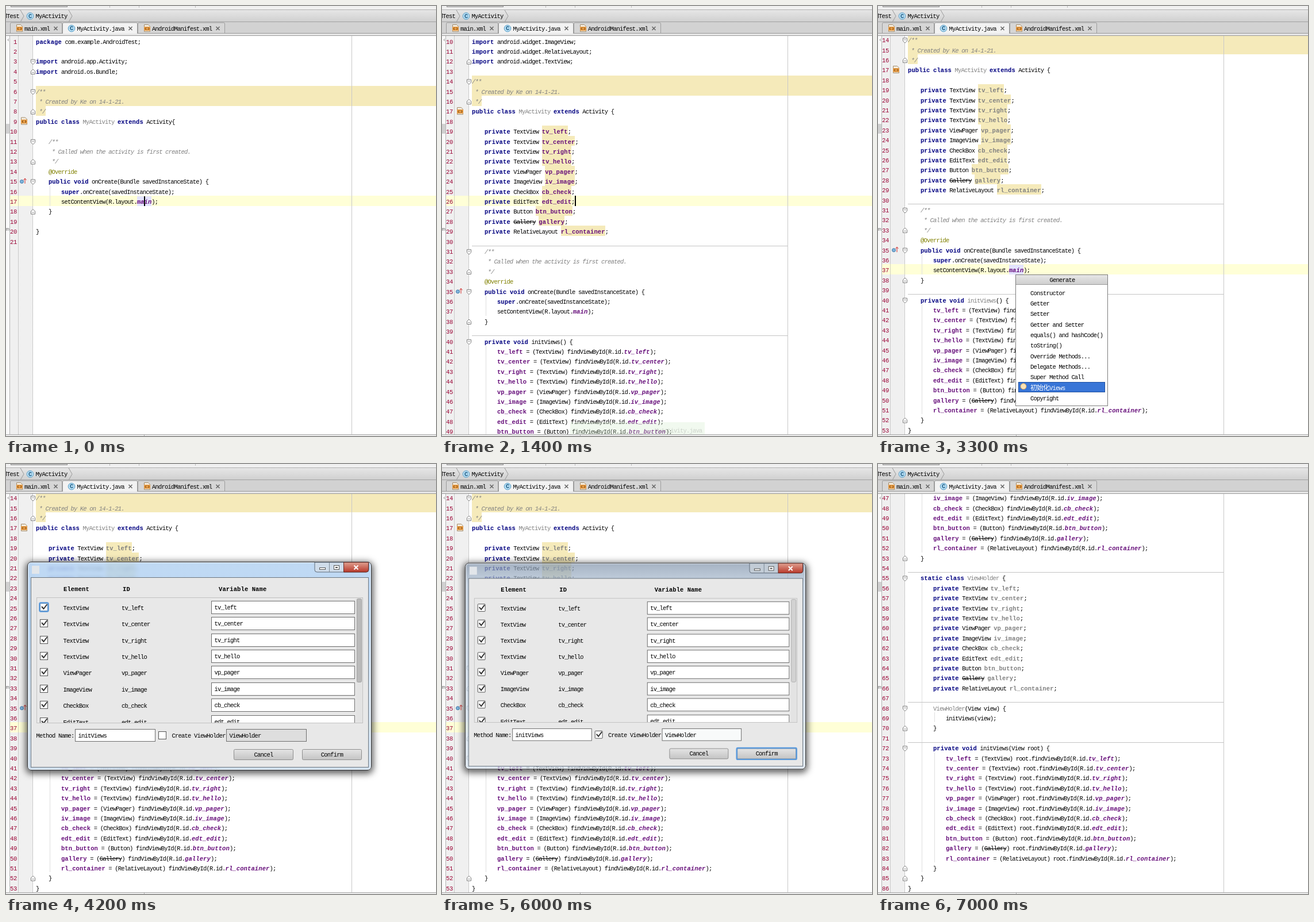
An HTML page for the animation above (8 s loop, 748 by 748 pixels).

```html
<!DOCTYPE html>
<html lang="en">
<head>
<meta charset="utf-8">
<title>Generate view fields</title>
<style>
html, body { margin: 0; width: 100%; height: 100%; overflow: hidden; background: #fff; }
#stage { position: relative; width: 748px; height: 748px; overflow: hidden; }
svg { position: absolute; left: 0; top: 0; display: block; }
text { font: 10.5px "Liberation Mono", "Noto Sans CJK SC", "Noto Sans CJK", monospace; letter-spacing: -.81px; fill: #000; }
rect, line { shape-rendering: crispEdges; }
.k, .i, .f, .n, .b { font-weight: bold; letter-spacing: .11px; }
.k { fill: #000080; }
.i, .f { fill: #660e7a; }
.i, .c { font-style: italic; }
.n, .c, .u { fill: #808080; }
.a { fill: #808000; }
.s { text-decoration: line-through; }
.num { fill: #990033; letter-spacing: -.3px; text-anchor: end; }
.w { fill: #fff; }
.round, .closing rect { shape-rendering: auto; }

.scene { visibility: hidden; animation: 8s step-end infinite; }
@keyframes start    { 0%     { visibility: visible } 17.5%  { visibility: hidden } }
@keyframes blink    { 0%     { visibility: visible } 5%     { visibility: hidden } }
@keyframes made     { 17.5%  { visibility: visible } 31.25% { visibility: hidden } }
@keyframes scrolled { 31.25% { visibility: visible } 41.25% { visibility: hidden } }
@keyframes second   { 41.25% { visibility: visible } 82.5%  { visibility: hidden } }
@keyframes holder   { 82.5%  { visibility: visible } 87.5%  { visibility: hidden } }
@keyframes end      { 87.5%  { visibility: visible } }
@keyframes menu1    { 5%     { visibility: visible } 10%    { visibility: hidden } }
@keyframes menu2    { 41.25% { visibility: visible } 52.5%  { visibility: hidden } }
@keyframes dlg1     { 10%    { visibility: visible } 17.5%  { visibility: hidden } }
@keyframes dlg2     { 52.5%  { visibility: visible } 58.75% { visibility: hidden } }
@keyframes dlg3     { 58.75% { visibility: visible } 75%    { visibility: hidden } }
@keyframes dlg4     { 75%    { visibility: visible } 82.5%  { visibility: hidden } }

.dlg { position: absolute; inset: 0; transform-origin: 337px 352px; }
.closing { transform: scale(.99); }
.glass {
  position: absolute; left: 37px; top: 170px; width: 597px; height: 361px;
  border: 1.5px solid #2a2e33; border-radius: 7px;
  background: linear-gradient(rgba(176,207,240,.8), rgba(170,208,246,.8) 30%, rgba(205,224,242,.8) 60%, rgba(196,216,236,.8));
  backdrop-filter: blur(3px);
  box-shadow: 0 3px 12px 3px rgba(0,0,0,.62), inset 0 0 0 1px rgba(255,255,255,.75);
}
.closing .glass {
  backdrop-filter: none;
  background: linear-gradient(rgba(132,150,172,.72), rgba(176,194,214,.72) 10%, rgba(208,221,234,.72));
}
</style>
</head>
<body>
<div id="stage"></div>
<script>
const CW = 5.49, BW = 6.41, ROW = 17.4, LEFT = 52;

const rect = (x, y, w, h, fill, more = '') =>
  `<rect x="${x}" y="${y}" width="${w}" height="${h}" fill="${fill}" ${more}/>`;
const box = (x, y, w, h, fill, stroke, more = '') =>
  rect(x + .5, y + .5, w - 1, h - 1, fill, `stroke="${stroke}" ${more}`);
const path = (d, stroke, fill = 'none', more = '') =>
  `<path d="${d}" stroke="${stroke}" fill="${fill}" ${more}/>`;
const text = (x, y, s, cls = '', more = '') =>
  `<text x="${x}" y="${y + 3.3}" class="${cls}" ${more}>${s}</text>`;
const svg = body => `<svg width="748" height="748" viewBox="0 0 748 748">${body}</svg>`;
const scene = (name, body) => `<g class="scene" style="animation-name:${name}">${body}</g>`;

// ---- the Java file in its three versions
const FIELDS = ['TextView tv_left', 'TextView tv_center', 'TextView tv_right', 'TextView tv_hello',
  'ViewPager vp_pager', 'ImageView iv_image', 'CheckBox cb_check', 'EditText edt_edit',
  'Button btn_button', 'Gallery gallery', 'RelativeLayout rl_container'].map(f => f.split(' '));
const pad = (n, lines) => lines.map(l => l && ' '.repeat(n) + l);
const declare = () => FIELDS.map(([type, id]) => `private ${type} ${id};`);
const assign = root => FIELDS.map(([type, id]) => `${id} = (${type}) ${root}findViewById(R.id.${id});`);
const method = (head, body) => [head + ' {', ...pad(4, body), '}'];

function source(version) {
  const full = version > 0, holder = version > 1;
  const imports = ['app.Activity', 'os.Bundle'];
  if (full) imports.push('support.v4.view.ViewPager');
  if (holder) imports.push('view.View');
  if (full) imports.push(...['Button', 'CheckBox', 'EditText', 'Gallery', 'ImageView', 'RelativeLayout', 'TextView'].map(w => 'widget.' + w));
  const body = [
    ...(full ? [...declare(), ''] : []),
    '/**', ' * Called when the activity is first created.', ' */', '@Override',
    ...method('public void onCreate(Bundle savedInstanceState)',
      ['super.onCreate(savedInstanceState);', 'setContentView(R.layout.main);']), '',
    ...(full ? method('private void initViews()', assign('')) : []),
    ...(holder ? ['', ...method('static class ViewHolder', [
      ...declare(), '',
      ...method('ViewHolder(View view)', ['initViews(view);']), '',
      ...method('private void initViews(View root)', assign('root.'))])] : [])
  ];
  return ['package com.example.AndroidTest;', '',
    ...imports.map(i => `import android.${i};`), '',
    '/**', ' * Created by Ke on 14-1-21.', ' */',
    `public class MyActivity extends Activity${full ? ' ' : ''}{`, '',
    ...pad(4, body), '}', ...(full ? [] : [''])];
}

// ---- syntax colours
const ids = FIELDS.map(f => f[1]).join('|');
const TOKEN = new RegExp('\\b(package|import|public|class|extends|private|void|super|static)\\b' +
  '|(?<=R\\.(?:id|layout)\\.)(\\w+)' + `|\\b(${ids})\\b` +
  '|((?<=class )(?:MyActivity|ViewHolder)|^ViewHolder)|(?<!widget\\.)\\b(Gallery)\\b|(initViews)(?=\\(\\) )', 'g');
const KINDS = ['k', 'i', 'f', 'u', 's', 'u'];
const span = (cls, s) => `<tspan class="${cls}">${s}</tspan>`;

function colour(s, fresh) {
  if (/^(\/\*|\*)/.test(s)) return span('c', s);
  if (s[0] === '@') return span('a', s);
  const unused = !fresh && /^private \w+ \w+;/.test(s);
  return s.replace(TOKEN, (m, ...groups) => {
    const i = groups.slice(0, 6).findIndex(Boolean);
    if (i === 5 && fresh) return m;
    return span(unused && i === 2 ? 'n' : KINDS[i], m);
  });
}

// ---- editor parts
const fileIcon = (x, y) =>
  path(`M${x + 1.5} ${y + .5}h7l3 3v9h-10z`, '#a08a6a', '#f6efe2') +
  rect(x + 1, y + 4, 11, 7, '#e59a45', 'rx="1" class="round"') +
  path(`M${x + 5} ${y + 5.5}l-2 2l2 2m3 -4l2 2l-2 2`, '#5a3200');
const classIcon = (x, y) =>
  `<circle cx="${x}" cy="${y}" r="5.8" fill="#b5dcf2" stroke="#5a9fc8"/>` +
  text(x - 3.1, y, 'C', 'b', 'style="fill:#1f5f88"');
const fold = (y, open) => {
  const d = open ? 1 : -1;
  return path(`M43.5 ${y - 4 * d}h7v${5 * d}l-3.5 ${3.5 * d}l-3.5 ${-3.5 * d}z`, '#7c7c7c', '#fff') +
    path(`M45.5 ${y - d}h3`, '#7c7c7c');
};

function editor(name, lines, first, y0, { row, caret, fresh, mark, extra = '' } = {}) {
  const at = n => y0 + (n - first) * ROW;
  const topOf = y => y - 10.6;
  const lastImport = lines.findLastIndex(l => l.startsWith('import'));
  const classLine = lines.findIndex(l => l.startsWith('public class'));
  const holderLine = lines.findIndex(l => l.includes('static class'));
  const full = lines.length > 30;
  let back = '', front = '';
  if (row) back += rect(7, topOf(at(row)), 741, ROW, '#ffffd7');
  lines.forEach((line, i) => {
    const n = i + 1, y = at(n);
    if (n < first || y > 760) return;
    const s = line.trim(), indent = line.length - line.trimStart().length, x = LEFT + indent * CW;
    const top = topOf(y);
    if (i < classLine && /^\s*(\/\*|\*)/.test(line))
      back += rect(LEFT, top, s === '*/' ? 17 : 696, ROW, '#f5eaba');
    const field = full && indent === 4 && s.match(/^private (\w+) (\w+);/);
    if (field)
      back += rect(x + 7 * BW + (2 + field[1].length) * CW, top, field[2].length * BW, ROW, '#f5eaba');
    if (mark && s.startsWith('setContent'))
      back += rect(x + 24 * CW, top + 1, 4 * BW, ROW - 1, '#e4e4ff');
    // indent guides
    for (let g = 4; g < indent || (!s && g < 8 && holderLine > 0 && i > holderLine); g += 4) {
      if (/^\*/.test(s)) break;
      const gx = LEFT + g * CW + 2.5;
      back += `<line x1="${gx}" x2="${gx}" y1="${top}" y2="${top + ROW}" stroke="#dedede"/>`;
    }
    const separated = full && !lines[i - 1] && i > classLine + 2 && /^(\/\*\*|static|ViewHolder|private void)/.test(s);
    if (separated) back += rect(LEFT, Math.round(y - 11.2), 550, 1, '#c4c4c4');

    front += text(19, y, n, 'num');
    if (s) front += text(x, y, colour(s, fresh));
    const opens = s === '/**' || (s.endsWith('{') && i !== classLine) || (s.startsWith('import') && !lines[i - 1]);
    const closes = s === '*/' || (s === '}' && indent) || i === lastImport;
    if (opens || closes) front += fold(y, opens);
    if (i === classLine) front += fileIcon(25, y - 8);
    if (s.includes('onCreate(Bundle'))
      front += `<circle cx="27.5" cy="${y - .5}" r="3" fill="#7fb4dc" stroke="#3f78a8"/>` +
        path(`M33 ${y + 3}v-9m-2.5 3l2.5 -3l2.5 3`, '#d03030');
  });
  const cursor = caret ? rect(caret, topOf(at(row)), 2, ROW, '#000') : '';
  return scene(name, `<g clip-path="url(#code)">${back}
    ${rect(601, 52, 1, 693, '#c8c8c8')}
    ${path('M21.5 52V745M46.5 52V745', '#a4a4a4', 'none', 'stroke-dasharray="1 1"')}
    ${front}${cursor}${extra}</g>`);
}

// ---- window chrome around the editor
function chrome() {
  const cross = x => path(`M${x - 3} 36l6 6m0 -6l-6 6`, '#666', 'none', 'stroke-width="1.5"');
  const tab = (x, w, fill) => path(`M${x + .5} 48V31q0 -2 2 -2h${w - 4}q2 0 2 2V48`, '#9c9c9c', fill);
  return rect(0, 0, 748, 748, '#fff') +
    rect(0, 0, 748, 7, '#f0f0f0') + rect(8, 0, 99, 2, '#8c8c8c') + rect(9, 0, 97, 1, '#d8d8d8') +
    [180, 231, 329].map(x => rect(x, 0, 1, 3, '#bbb')).join('') +
    rect(0, 6, 748, 1, '#b0b0b0') + rect(0, 7, 748, 21, 'url(#bar)') +
    path('M25 7l6 10.5l-6 10.5M109 7l6 10.5l-6 10.5', '#999') +
    text(-4.5, 17.5, 'dTest') + classIcon(42, 17.5) + text(51.5, 17.5, 'MyActivity') +
    rect(0, 27, 748, 1, '#a2a2a2') + rect(0, 28, 748, 20, '#d2d2d2') +
    tab(7, 90, '#d6d6d6') + tab(229, 151, '#d6d6d6') + tab(98, 130, '#f2f2f2') +
    rect(0, 48, 748, 3, '#e6e6e6') + rect(0, 47, 98, 1, '#9c9c9c') + rect(228, 47, 520, 1, '#9c9c9c') +
    rect(0, 51, 748, 1, '#9a9a9a') +
    fileIcon(17, 32) + text(32, 39.5, 'main.xml') + cross(86.5) +
    classIcon(114, 39) + text(123.5, 39.5, 'MyActivity.java') + cross(216.5) +
    fileIcon(239, 32) + text(254, 39.5, 'AndroidManifest.xml') + cross(368.5) +
    rect(0, 52, 6, 693, '#fafafa') + rect(0, 205, 6, 17, '#d0d0d0') +
    path('M5 57l-2 2l2 2M0 391v-4h2v4m0 -4h3v4', '#888') +
    rect(6, 52, 1, 693, '#b4b4b4') + rect(7, 52, 40, 693, '#f0f0f0') +
    rect(0, 745, 748, 3, '#ececec') + rect(0, 745, 748, 1, '#a8a8a8') + rect(240, 746, 1, 2, '#aaa');
}

// ---- popup menu
const ITEMS = ['Constructor', 'Getter', 'Setter', 'Getter and Setter', 'equals() and hashCode()', 'toString()',
  'Override Methods...', 'Delegate Methods...', 'Super Method Call', '初始化Views', 'Copyright'];
function menu(name, y) {
  return scene(name, box(239, y, 161, 229, '#fff', '#7c7c7c') +
    rect(240, y + 1, 159, 16, 'url(#bar)') + rect(240, y + 17, 159, 1, '#9a9a9a') +
    text(298.5, y + 9.5, 'Generate') +
    ITEMS.map((s, i) => {
      const c = y + 32.5 + i * 18.3, on = i === 9;
      return (on ? box(244, Math.round(c - 10), 151, 18, '#3875d7', '#1d4fa0') +
        `<circle cx="253" cy="${c - 2.5}" r="5" fill="#fbe3b8" stroke="#e8a850"/>` : '') +
        text(265, c, s.replace(/[^\x00-\x7f]+/, '<tspan style="font-size:11.8px">$&</tspan>'), on ? 'w' : '');
    }).join(''));
}

// ---- dialog
function dialog(name, { focus, holder, dark, closing }) {
  const ring = (x, y, w, h) => rect(x - .5, y - .5, w + 1, h + 1, 'none', 'stroke="#5c9bdc" stroke-width="2.5" rx="2" class="round"');
  const check = (x, y, on, lit) => box(x, y, 14, 14, '#fff', '#555', 'rx="1"') + (lit ? ring(x, y, 14, 14) : '') +
    (on ? path(`M${x + 3} ${y + 6}l3.5 4l6 -8`, '#333', 'none', 'stroke-width="2"') : '');
  const input = (x, y, w, h, s, fill = '#fff') => box(x, y, w, h, fill, '#6e6e6e') + text(x + 5.5, y + h / 2 + .5, s);
  const button = (x, s, lit) => box(x, 496, 104, 19, 'url(#button)', '#8e8e8e', 'rx="2" class="round"') +
    (lit ? ring(x, 496, 104, 19) : '') + text(x + 52 - s.length * CW / 2, 505.5, s);
  const rows = FIELDS.slice(0, 8).map(([type, id], i) => {
    const y = 249.7 + i * 28.4, t = Math.round(y);
    return check(59, t - 8, true, focus === 'first' && !i) + text(99.5, y + .8, type) + text(201, y + .8, id) +
      input(357, t - 12, 250, 23, id);
  }).join('');
  const caption =
    path('M537 171v13q0 4 4 4h86q4 0 4 -4v-13z', '#5f6b78', closing ? '#c2ccd6' : '#cfdcea') +
    path('M587.5 171v17h39q4 0 4 -4v-13z', '#6a2a22', 'url(#close)') +
    path('M562.5 171v17', '#7d8995') +
    box(545, 180, 11, 4, '#fff', '#555') + box(570, 176, 10, 8, '#fff', '#555') + box(573, 179, 4, 2, '#fff', '#555') +
    path('M605.5 176.5l7 7m0 -7l-7 7', '#fff', 'none', 'stroke-width="2"');
  return `<div class="scene dlg ${closing ? 'closing' : ''}" style="animation-name:${name}"><div class="glass"></div>` + svg(
    rect(45, 177, 13, 14, '#e2e6ea') + caption +
    box(43, 197, 588, 331, '#e8e8e8', '#6c7680') +
    text(100, 217.5, 'Element', 'b') + text(203, 217.5, 'ID', 'b') +
    text(370, 217.5, 'Variable Name', 'b') +
    box(53, 232, 568, 219, '#e8e8e8', '#c2c2c2') +
    `<g clip-path="url(#table)">${rows}</g>` +
    rect(609, 233, 11, 217, '#e3e3e3') +
    box(610, 234, 9, 146, dark ? '#bababa' : '#d2d2d2', dark ? '#a2a2a2' : '#b2b2b2', 'rx="2" class="round"') +
    text(52.5, 473, 'Method Name:') + input(120, 461, 140, 22, 'initViews') +
    check(265, 465, holder, focus === 'holder') + text(288.5, 473, 'Create ViewHolder') +
    input(383, 461, 140, 22, 'ViewHolder', holder ? '#f8fafa' : '#dedede') +
    button(396, 'Cancel') + button(515, 'Confirm', focus === 'confirm')) + '</div>';
}

const gradient = (id, a, b) => `<linearGradient id="${id}" x2="0" y2="1"><stop stop-color="${a}"/><stop offset="1" stop-color="${b}"/></linearGradient>`;
const clip = (id, ...r) => `<clipPath id="${id}">${rect(...r, '#000')}</clipPath>`;
const defs = '<defs>' + gradient('bar', '#e6e6e6', '#cfcfcf') + gradient('button', '#e4e4e4', '#c4c4c4') +
  gradient('close', '#e0a090', '#b8382a') + clip('code', 7, 52, 741, 693) + clip('table', 54, 233, 566, 217) + '</defs>';

const plain = source(0), views = source(1), holders = source(2);
const balloon = rect(223, 724, 234, 21, '#d8eed0', 'opacity=".35"') +
  text(370, 738.5, 'MyActivity.java', '', 'opacity=".15"');
const TOP = 62.3, SNAP = 59.8;

document.getElementById('stage').innerHTML = svg(defs + chrome() +
  editor('start', plain, 1, TOP, { row: 17, mark: true }) +
  scene('blink', rect(240, 331, 2, 17, '#000')) +
  editor('made', views, 10, TOP, { row: 26, caret: 231, fresh: true, extra: balloon }) +
  editor('scrolled', views, 11, SNAP, { row: 26, caret: 231 }) +
  editor('second', views, 14, SNAP, { row: 37, mark: true }) +
  editor('holder', holders, 15, SNAP, { row: 38, caret: 240, mark: true }) +
  editor('end', holders, 47, SNAP) +
  menu('menu1', 348) + menu('menu2', 467)) +
  dialog('dlg1', { focus: 'confirm' }) +
  dialog('dlg2', { focus: 'first', dark: true }) +
  dialog('dlg3', { focus: 'holder', holder: true }) +
  dialog('dlg4', { focus: 'confirm', holder: true, closing: true });
</script>
</body>
</html>
```
